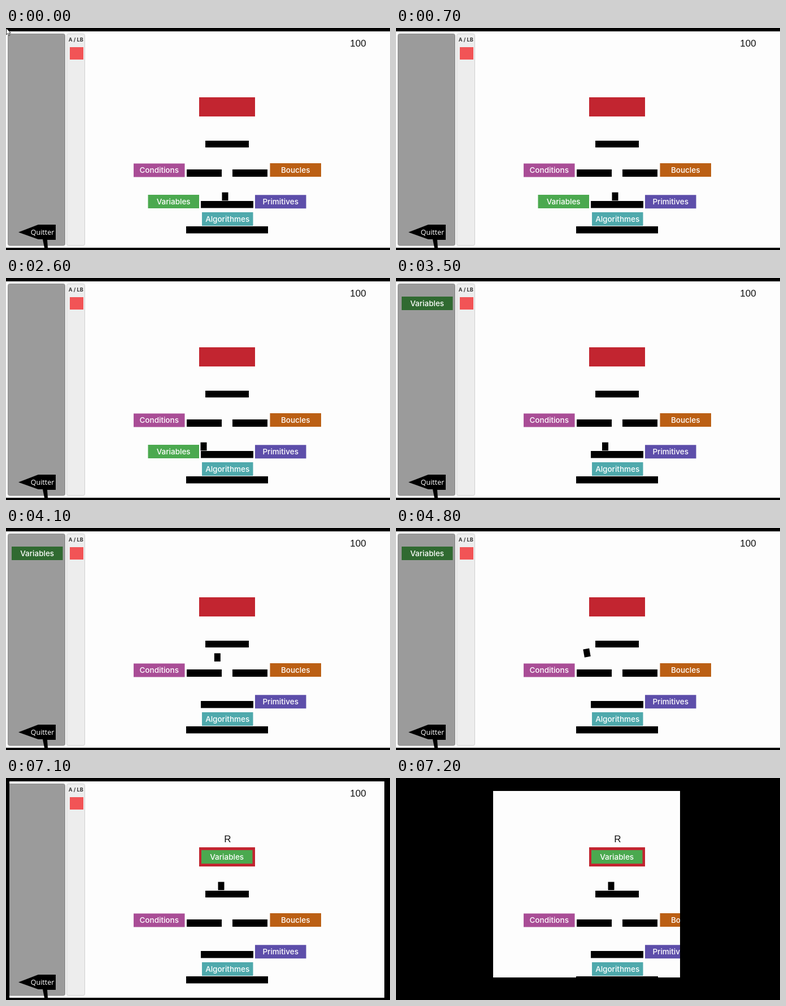
An HTML page that plays this animation: 680 px wide and 394 px high, repeating every 7.3 s.

```html
<!DOCTYPE html>
<html lang="fr">
<head>
<meta charset="utf-8">
<title>Blocs</title>
<style>
  html, body { margin: 0; width: 100%; height: 100%; overflow: hidden; background: #000; }
  svg { display: block; width: 680px; height: 394px; }
  .label { font: 500 13.5px Inter, sans-serif; fill: #fff; text-anchor: middle; }
  .plain { font: 17px "Liberation Sans", sans-serif; fill: #111; }
  .slot { font: 700 9.2px Inter, sans-serif; fill: #333; text-anchor: middle; }
  .quit { font: 12.5px "Open Sans", sans-serif; fill: #fff; text-anchor: middle; }
</style>
</head>
<body>
<svg id="scene" viewBox="0 0 680 394">
  <rect width="680" height="394"/>
  <rect y="6" width="680" height="384" fill="#fdfdfd"/>

  <rect x="3.5" y="10.5" width="101" height="375.5" rx="3" fill="#9b9b9b" stroke="#8c8c8c"/>
  <rect x="107.5" y="10.5" width="32" height="375.5" rx="3" fill="#ededed" stroke="#d0d0d0"/>
  <text class="slot" x="123.7" y="24.3">A / LB</text>
  <rect x="113" y="34" width="24" height="22" fill="#f25456"/>
  <text class="plain" x="609.3" y="33">100</text>

  <path d="M22 362.5 57 349H88V376H73L74 390H68L65 375H57Z"/>
  <text class="quit" x="64.5" y="366.5">Quitter</text>

  <path d="M353 200h77v12h-77zM320 251h62v13h-62zM401 251h62v13h-62zM345 307h93v12.5h-93zM319 352h145v12.5h-145z"/>
  <rect x="342" y="123" width="99" height="34" fill="#c22530"/>
  <g id="blocks"></g>
  <text id="prompt" class="plain" x="392.3" y="114.3" text-anchor="middle">R</text>

  <g id="runner"><g id="jumper"><rect id="body" x="-5.5" y="-7.3" width="11" height="14.6"/></g></g>
  <path id="cursor" d="M.5 .5V12L3.2 9.5 5 13.5 6.8 12.7 5 8.8H8.5Z" fill="#fff" stroke="#000" stroke-width=".8"/>
</svg>
<script>
  const LOOP = 7300, STEP = 100;
  const $ = id => document.getElementById(id);

  const blocks = [
    ["Conditions", 226, 240.5, "#a94d96"],
    ["Boucles", 467.5, 240, "#bb5f14"],
    ["Primitives", 441, 296.3, "#5d4eaa"],
    ["Algorithmes", 347, 327, "#4fa9ac"],
    ["Variables", 251.5, 296, "#4ba94f", "free"],
    ["Variables", 10, 33, "#306a31", "held"],
    ["Variables", 346, 128, "#4ba94f", "placed"]
  ];
  $("blocks").innerHTML = blocks.map(([name, x, y, fill, id = name]) =>
    `<g id="${id}"><rect x="${x}" y="${y}" width="90.5" height="24" fill="${fill}"/>
     <text class="label" x="${x + 45.2}" y="${y + 16.7}">${name}</text></g>`).join("");

  // keys: [ms, value, easing]; the whole loop ticks in STEP increments
  function play(id, prop, keys) {
    const frames = keys.map(([ms, value, easing = "linear"]) =>
      ({ offset: ms / LOOP, [prop]: value, easing }));
    frames.push({ offset: 1, [prop]: keys[keys.length - 1][1] });
    $(id).animate(frames, {
      duration: LOOP, iterations: Infinity, easing: `steps(${LOOP / STEP}, end)`
    });
  }

  // switches fall half a tick early so each lands cleanly on its tick
  function show(id, from, to = LOOP) {
    const keys = from ? [[0, 0, "step-end"], [from - STEP / 2, 1, "step-end"]] : [[0, 1, "step-end"]];
    if (to < LOOP) keys.push([to - STEP / 2, 0, "step-end"]);
    play(id, "opacity", keys);
  }

  show("cursor", 0, 100);
  show("free", 0, 2900);
  show("held", 2900, 5600);
  show("placed", 5600);
  show("prompt", 5200);

  const rise = "cubic-bezier(.333,.667,.667,1)";
  const fall = "cubic-bezier(.333,0,.667,.333)";

  play("runner", "translate", [
    [0, 388], [900, 388], [1500, 394.5], [1700, 396], [2000, 396],
    [2600, 350], [3200, 350], [3500, 370.5], [3700, 391], [3900, 391],
    [4200, 366], [4550, 334], [4700, 334], [4800, 338], [5200, 381]
  ].map(([ms, x]) => [ms, `${x}px 0px`]));

  play("jumper", "translate", [
    [0, 299], [3700, 299, rise], [4000, 225, fall], [4200, 243.5],
    [4760, 243.5, rise], [5000, 172, fall], [5200, 191.7]
  ].map(([ms, y, easing]) => [ms, `0px ${y}px`, easing]));

  play("body", "rotate", [
    [0, "0deg"], [4700, "0deg"], [4800, "-10deg"], [5000, "-8deg"], [5200, "0deg"]
  ]);

  // square shutter closing on the stage
  play("scene", "clipPath", [
    [0, "inset(-310px -157px -293px -160px)"],
    [7000, "inset(-310px -157px -293px -160px)"],
    [7100, "inset(-143.5px 10px -126.5px 6px)"],
    [7200, "inset(23px 177px 40px 172px)"]
  ]);
</script>
</body>
</html>
```
